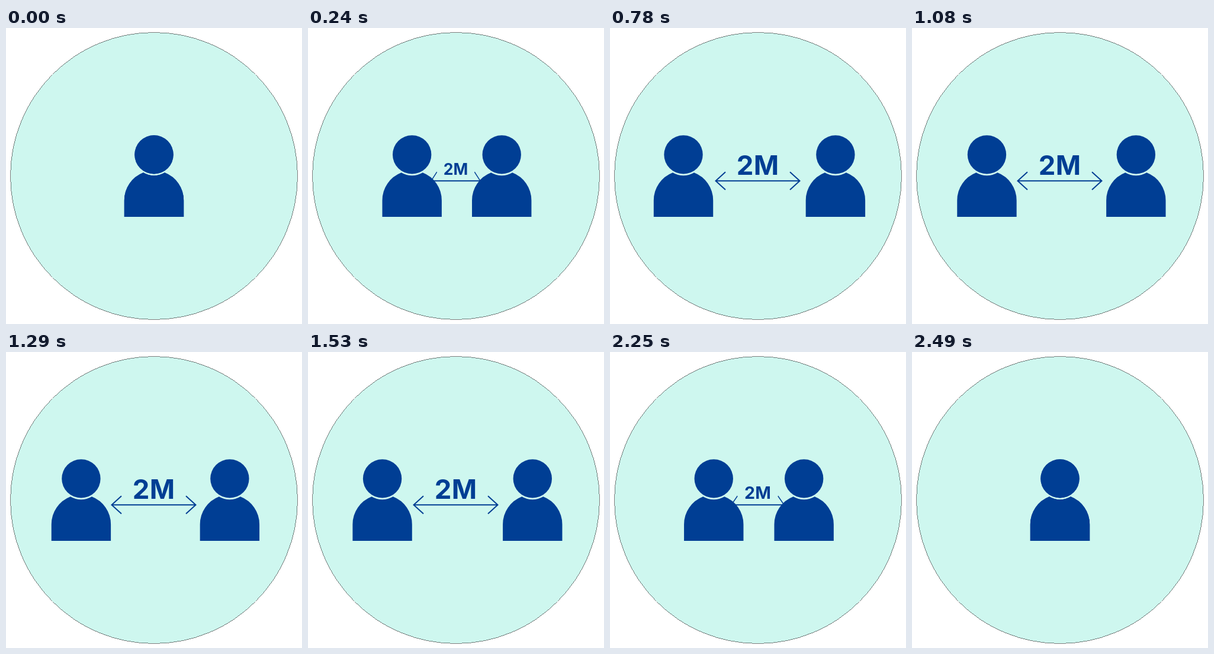
Write an HTML page that moves like this. It is 500 px wide and 500 px high and loops after 2760 ms.

```html
<!DOCTYPE html>
<html lang="en">
<head>
<meta charset="utf-8">
<title>Keep your distance</title>
<style>
  html, body { margin: 0; height: 100%; overflow: hidden; background: #fff; }
  svg { display: block; width: 100vw; height: 100vh; }
  text { font: 700 45.5px Inter, "Open Sans", sans-serif; letter-spacing: .4px; text-anchor: middle; }
</style>
</head>
<body>
<svg viewBox="0 0 500 500" fill="#003e94">
  <defs>
    <g id="person">
      <circle cx="250" cy="213.9" r="32.7"/>
      <path d="M199.8 319V291.2A50.2 50.2 0 0 1 232 244.35A35.3 35.3 0 0 0 268 244.35A50.2 50.2 0 0 1 300.2 291.2V319Z"/>
    </g>
  </defs>
  <circle cx="250" cy="250" r="242.5" fill="#cef7ef" stroke="#000" stroke-width=".5" shape-rendering="crispEdges"/>
  <path id="arrow" d="M-71 0H71M-54.5 -15L-71 0L-54.5 15M54.5 -15L71 0L54.5 15" fill="none" stroke="#003e94" stroke-width="2"/>
  <text id="label">2M</text>
  <use id="left" href="#person"/>
  <use id="right" href="#person"/>
</svg>
<script>
  const LOOP = 2760, STEP = 30;
  const OPENED = 462, CLOSED = 2490;
  const SWAY_START = 508, SWAY_END = 1980;
  const $ = id => document.getElementById(id);
  const clamp = (v, lo, hi) => Math.min(hi, Math.max(lo, v));

  // Cubic Bezier easing (.33, 0, .58, 1), solved by bisection.
  function ease(x) {
    if (x <= 0 || x >= 1) return clamp(x, 0, 1);
    let lo = 0, hi = 1, s;
    for (let i = 0; i < 24; i++) {
      s = (lo + hi) / 2;
      const bx = 3 * (1 - s) ** 2 * s * .33 + 3 * (1 - s) * s * s * .58 + s ** 3;
      if (bx < x) lo = s; else hi = s;
    }
    return s * s * (3 - 2 * s);
  }

  const spread = (t, closing) =>
    ease(t / OPENED) * (1 - ease((t - closing) / (CLOSED - closing)));

  function sway(t) {
    const phase = (clamp(t, SWAY_START, SWAY_END) - SWAY_START) / (SWAY_END - SWAY_START);
    return 125.15 + 2.1 * Math.cos(phase * 2 * Math.PI);
  }

  const place = (id, value) => $(id).setAttribute("transform", value);

  function draw() {
    const t = Math.floor(performance.now() % LOOP / STEP) * STEP;
    const offset = sway(t) * spread(t, 2082);
    const scale = spread(t, 2099);
    place("left", `translate(${-offset})`);
    place("right", `translate(${offset * 1.039})`);
    place("arrow", `translate(249.5 258.2) scale(${scale} 1)`);
    place("label", `translate(249.6 248) scale(${scale})`);
    requestAnimationFrame(draw);
  }
  draw();
</script>
</body>
</html>
```
